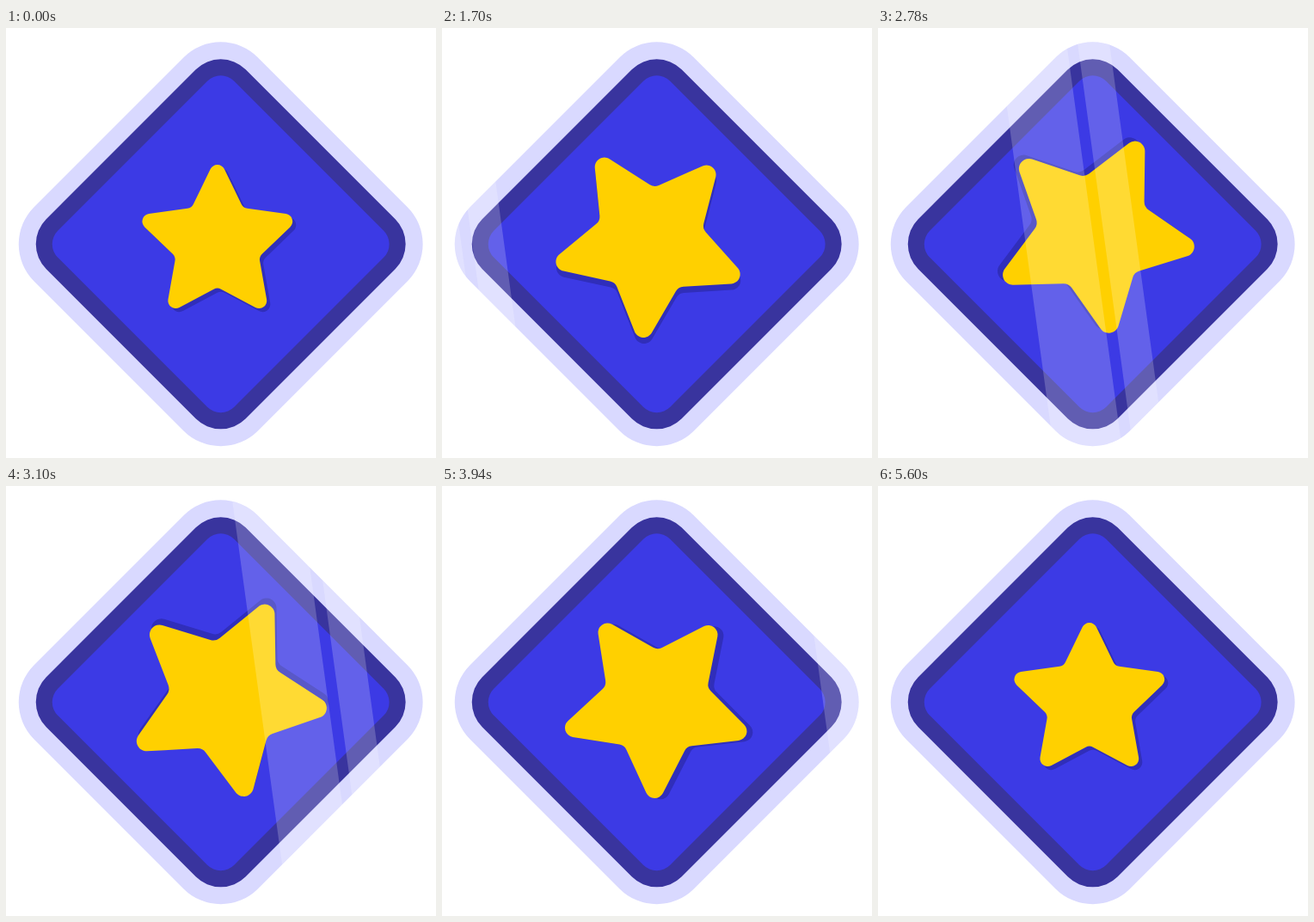
These frames come from a looping animation (500x500 px, 8 s). An HTML page with a canvas:

```html
<!DOCTYPE html>
<html lang="en">
<head>
<meta charset="utf-8">
<title>Star badge</title>
<style>
  html, body { margin: 0; width: 100%; height: 100%; overflow: hidden; background: #fff; }
  canvas { display: block; width: 500px; height: 500px; }
</style>
</head>
<body>
<canvas id="stage" width="500" height="500"></canvas>
<script>
const ctx = document.getElementById('stage').getContext('2d');
const LOOP = 8000, STEPS = 120;
const CENTER = [249.7, 251.3], PIVOT = [248.6, 245.3];

// Symmetric cubic ease, solved for x by bisection.
function ease(x, a = 0.68) {
  let lo = 0, hi = 1;
  for (let i = 0; i < 30; i++) {
    const u = (lo + hi) / 2, v = 1 - u;
    if (3 * a * u * v * v + 3 * (1 - a) * u * u * v + u * u * u < x) lo = u;
    else hi = u;
  }
  return lo * lo * (3 - 2 * lo);
}

// Poses are held for 20, 100 and 20 ms in turn.
function progress(ms) {
  const phase = ms % 140;
  const step = 3 * Math.floor(ms / 140) + (phase < 20 ? 0 : phase < 120 ? 1 : 2);
  return Math.min(step / STEPS, 1);
}

function diamondPath(radius) {
  const half = 123 + radius, path = new Path2D(), square = new Path2D();
  square.roundRect(-half, -half, 2 * half, 2 * half, radius);
  path.addPath(square, new DOMMatrix().translate(...CENTER).rotate(45));
  return path;
}

function starPath() {
  const path = new Path2D();
  const corner = i => {
    const r = i % 2 ? 51 : 103, angle = i * Math.PI / 5;
    return [r * Math.sin(angle), -r * Math.cos(angle)];
  };
  const a = corner(9), b = corner(0);
  path.moveTo((a[0] + b[0]) / 2, (a[1] + b[1]) / 2);
  for (let i = 0; i < 10; i++) path.arcTo(...corner(i), ...corner(i + 1), 9);
  path.closePath();
  return path;
}

const rim = diamondPath(61), ring = diamondPath(41), face = diamondPath(22);
const star = starPath();

function fill(path, color, x = 0, y = 0) {
  ctx.save();
  ctx.translate(x, y);
  ctx.fillStyle = color;
  ctx.fill(path);
  ctx.restore();
}

// Slanted band; left is its x position at y = 250.
function band(path, left, width) {
  const lean = 0.137 * 250;
  path.moveTo(left - lean, 0);
  path.lineTo(left - lean + width, 0);
  path.lineTo(left + lean + width, 500);
  path.lineTo(left + lean, 500);
  path.closePath();
}

function draw(ms) {
  const p = progress(ms), turn = ease(p);
  const scale = 1 + 0.29 * ease(1 - Math.abs(2 * p - 1));

  ctx.clearRect(0, 0, 500, 500);
  fill(rim, '#d9d9ff');
  fill(ring, '#39349e');
  fill(face, '#3c3ae5');

  ctx.save();
  ctx.translate(...PIVOT);
  ctx.rotate(turn * 2 * Math.PI);
  ctx.scale(scale, scale);
  fill(star, '#302eba', 1.3, 9.2);
  fill(star, '#ffd000', -2.8, 5.1);
  ctx.restore();

  const shine = new Path2D(), left = -128 + 632 * turn;
  band(shine, left, 79.5);
  band(shine, left + 92.3, 37);
  ctx.save();
  ctx.clip(rim);
  fill(shine, 'rgba(255,255,255,0.2)');
  ctx.restore();
}

const start = performance.now();
function tick() {
  draw((performance.now() - start) % LOOP);
  requestAnimationFrame(tick);
}
tick();
</script>
</body>
</html>
```
